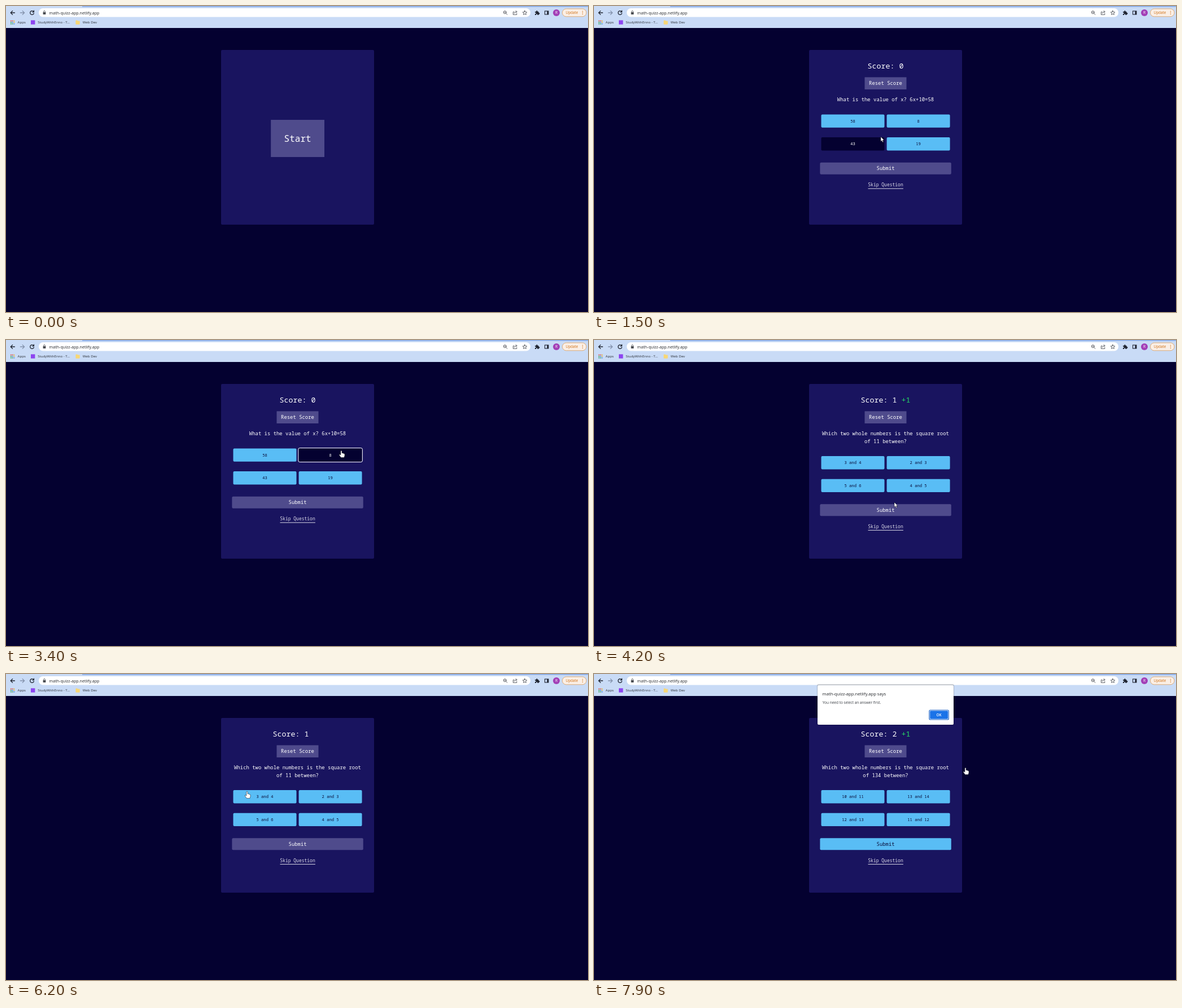
An HTML page that plays this animation: 1031x543 px, repeating every 8000 ms.

```html
<!DOCTYPE html>
<html lang="en">
<head>
<meta charset="utf-8">
<title>Math quiz</title>
<style>
  html, body { margin: 0; width: 100%; height: 100%; overflow: hidden; background: #040130; }
  svg { display: block; width: 1031px; height: 543px; }
  text { font-family: "Open Sans", sans-serif; }
  .app text { font-family: "Noto Sans Mono", monospace; text-anchor: middle; white-space: pre; }
  .line { fill: none; stroke-linecap: round; stroke-linejoin: round; }
</style>
</head>
<body>
<svg viewBox="0 0 1031 543">
  <rect width="1031" height="543" fill="#040130"/>

  <g id="toolbar">
    <rect width="1031" height="39" fill="#c9dbf6"/>
    <rect x="135" width="896" height="1.6" fill="#86abe9"/>
    <rect x="58" y="4" width="871" height="15.6" rx="7.8" fill="#fff"/>
    <g class="line" stroke="#1f2430" stroke-width="1.3">
      <path d="M15.4 12H8.4M11.6 8.6L8.2 12l3.4 3.4"/>
      <path d="M25.4 12h7M29.2 8.6l3.4 3.4-3.4 3.4" stroke="#8492ac"/>
      <path d="M48.9 10A3.4 3.4 0 1 0 49.4 13M49.4 8.2v2.6h-2.6"/>
    </g>
    <rect x="65.6" y="11" width="4.8" height="4" rx=".6" fill="#4a4d52"/>
    <path class="line" d="M66.6 11V9.9a1.4 1.4 0 0 1 2.8 0V11" stroke="#4a4d52" stroke-width=".8"/>
    <text x="76.6" y="14.5" font-size="7.15" fill="#24272c">math-quizz-app.netlify.app</text>

    <g class="line" stroke="#4d5157" stroke-width=".9">
      <circle cx="883.8" cy="11.2" r="2.5"/>
      <path d="M885.7 13.1l2.2 2.3M882.7 11.2h2.2"/>
      <path d="M900 10.4h-1.6v5h6.4v-2M900.4 13.2c.2-2 1.4-3 3.6-3M903 8.4l2.4 1.9-2.4 1.9"/>
      <path d="M919 8.3l1.1 2.5 2.7.2-2.1 1.8.7 2.6-2.4-1.4-2.4 1.4.7-2.6-2.1-1.8 2.7-.2z"/>
    </g>
    <path d="M937 10h2.2a1.3 1.3 0 1 1 2.4 0h2v2.1a1.3 1.3 0 1 1 0 2.4v1.4h-2.2a1.2 1.2 0 1 0-2.2 0H937v-2a1.2 1.2 0 1 0 0-2.2z" fill="#1f2430"/>
    <rect x="954.5" y="9" width="6.4" height="6" fill="none" stroke="#1f2430" stroke-width="1.1"/>
    <rect x="958.4" y="9" width="2.6" height="6" fill="#1f2430"/>
    <circle cx="975" cy="12" r="6" fill="#a23eb6"/>
    <text x="975" y="14.4" font-size="6.6" fill="#fff" text-anchor="middle">R</text>
    <rect x="985.5" y="5" width="42.5" height="13.8" rx="6.9" fill="#faefe6" stroke="#dfa568" stroke-width=".9"/>
    <text x="991.5" y="14.2" font-size="6.4" fill="#cf6f14">Update</text>
    <g fill="#cf6f14"><circle cx="1021.4" cy="9.4" r=".7"/><circle cx="1021.4" cy="12" r=".7"/><circle cx="1021.4" cy="14.6" r=".7"/></g>

    <g id="grid"></g>
    <rect x="44" y="25.3" width="7.4" height="7.4" fill="#8d45f0"/>
    <path d="M123.4 26.4q0-.9.9-.9h2l.9 1h2.6q.9 0 .9.9v4.4q0 .9-.9.9h-5.5q-.9 0-.9-.9z" fill="#f8d775"/>
    <g font-size="6.15" fill="#2b2f36">
      <text x="20.5" y="31.2">Apps</text>
      <text x="56.2" y="31.2">StudyWithEnno - T...</text>
      <text x="135.8" y="31.2">Web Dev</text>
    </g>
  </g>

  <g class="app">
    <rect x="381" y="78" width="271" height="310" rx="2" fill="#19145f"/>
    <g id="view"></g>
  </g>

  <g id="dialog">
    <rect x="395" y="18" width="243" height="73" rx="3" fill="#000" opacity=".18"/>
    <rect x="396" y="20" width="241" height="70" rx="2" fill="#fff"/>
    <text x="404.6" y="37.6" font-size="7.66" fill="#222529">math-quizz-app.netlify.app says</text>
    <text x="404.8" y="52.5" font-size="6.5" fill="#3a3e44">You need to select an answer first.</text>
    <rect x="593.9" y="64" width="34.4" height="17" rx="2" fill="#fff" stroke="#1b62c8" stroke-width="1.2"/>
    <rect x="595.2" y="65.3" width="31.8" height="14.4" rx="1.4" fill="#1a73e8"/>
    <text x="611" y="74.8" font-size="6.4" font-weight="600" fill="#fff" text-anchor="middle">OK</text>
  </g>

  <g id="cursor" fill="#fff" stroke="#05020f" stroke-width=".5" stroke-linejoin="round">
    <path id="arrow" d="M0 0V8.4L1.9 6.7 3.2 9.8 4.7 9.2 3.4 6.1H6z"/>
    <path id="hand" d="M-1.1 1Q0-.7 1.1 1V4.8Q2.6 4 3 5.2 4.3 4.5 4.7 5.8 6 5.4 6 6.8V9.3L5 12.6H-.6L-3.7 8.2Q-4 6.5-2.6 7L-1.1 8.2z"/>
  </g>
</svg>

<script>
const LOOP = 8000, STEP = 100, MID = 516.5;
const NAVY = '#040130', SKY = '#59bdf5', GREY = '#4f4b8c';
const $ = id => document.getElementById(id);

const questions = [
  { from: 1100, lines: ['What is the value of x? 6x+10=58'], answers: ['58', '8', '43', '19'] },
  { from: 4200, lines: ['Which two whole numbers is the square root', 'of 11 between?'],
    answers: ['3 and 4', '2 and 3', '5 and 6', '4 and 5'] },
  { from: 7300, lines: ['Which two whole numbers is the square root', 'of 134 between?'],
    answers: ['10 and 11', '13 and 14', '12 and 13', '11 and 12'] }
];

// Pointer moves: start, end, evenly timed points; it rests in between.
const moves = [
  [200, 600, '112,57 240,110 390,180 500,230 526,259'],
  [1100, 1500, '526,259 508,250 490,244 498,240 508,232'],
  [1700, 2300, '540,222 585,180 628,145 655,125 672,140 673,172 672,200'],
  [2500, 3200, '672,212 666,228 618,210 596,197'],
  [3400, 3800, '594,196 588,214 570,244 546,279 533,287'],
  [4000, 4000, '532,288'],
  [4700, 5500, '518,284 430,240 330,231'],
  [5700, 6300, '324,228 334,227 352,224 378,218 400,212 427,208 430,208'],
  [6500, 7100, '430,208 446,236 466,268 484,293 491,292 491,293 492,294'],
  [7300, 7300, '494,298'],
  [7900, 7900, '658,166']
].map(([a, b, pts]) => ({ a, b, pts: pts.split(' ').map(p => p.split(',').map(Number)) }));

function pointer(t) {
  const m = moves.filter(m => m.a <= t).pop();
  if (!m) return null;
  const last = m.pts.length - 1;
  const u = m.b > m.a ? Math.min(1, (t - m.a) / (m.b - m.a)) * last : 0;
  const i = Math.floor(u), p = m.pts[i], q = m.pts[Math.min(i + 1, last)];
  return p.map((v, k) => v + (q[k] - v) * (u - i));
}

const inside = (p, b) => p && p[0] >= b.x && p[0] <= b.x + b.w && p[1] >= b.y && p[1] <= b.y + b.h;
const text = (x, y, size, s, fill = '#fff') => `<text x="${x}" y="${y}" font-size="${size}" fill="${fill}">${s}</text>`;
const box = (b, fill) => `<rect x="${b.x}" y="${b.y}" width="${b.w}" height="${b.h}" rx="${b.r}" fill="${fill}"/>`;
const label = (b, size, s, fill) => text(b.x + b.w / 2, b.y + b.h / 2 + size * .36, size, s, fill);

function render(t) {
  const now = pointer(t), before = pointer(t - STEP);
  const frozen = t >= 7500;
  const targets = [];
  // The hover colour trails the pointer by one step.
  const hot = b => { targets.push(b); return inside(before, b); };
  let out = '';

  if (t < 800) {
    const b = { x: 469.2, y: 202, w: 94.8, h: 66, r: 0 }, on = hot(b);
    out += box(b, on ? SKY : GREY) + label(b, 16, 'Start', on ? NAVY : '#fff');
  } else {
    const q = questions.filter(q => q.from <= t).pop();
    const score = t < 4200 ? 0 : t < 7100 ? 1 : 2;
    const plus = t < 5200 || t >= 7100 ? '#27d965' : 'none';
    const bonus = score ? ` <tspan fill="${plus}">+1</tspan>` : '';
    out += text(MID, 110.8, 13.3, `Score: ${score}${bonus}`);

    const reset = { x: 479.5, y: 126.4, w: 74, h: 21.6, r: 0 };
    out += box(reset, GREY) + label(reset, 8.93, 'Reset Score', '#fff');

    const shift = q ? (q.lines.length - 1) * 13.6 : -97;
    if (q) {
      q.lines.forEach((s, i) => out += text(MID, 169.2 + i * 13.5, 8.93, s));
      const picked = t >= 3200 && t < 4200 ? 1 : t >= 6500 && t < 7100 ? 0 : -1;
      q.answers.forEach((s, i) => {
        const b = { x: 402.5 + i % 2 * 116.1, y: 192.4 + shift + (i >> 1) * 40.7, w: 112, h: 23.4, r: 2 };
        const on = hot(b) && !frozen || i === picked;
        out += box(b, on ? NAVY : SKY) + label(b, 7.17, s, on ? '#fff' : '#0a0c38');
        if (i === picked)
          out += `<rect x="${b.x - .8}" y="${b.y - .8}" width="${b.w + 1.6}" height="${b.h + 1.6}" rx="2.6" fill="none" stroke="#fff"/>`;
      });
    }
    const submit = { x: 400.4, y: 277.7 + shift, w: 232.4, h: 21, r: 2 };
    const on = hot(submit) || frozen;
    out += box(submit, on ? SKY : GREY) + label(submit, 8.93, 'Submit', on ? '#0a0c38' : '#fff');
    out += text(MID, 320.4 + shift, 8, 'Skip Question', '#dddce9');
    out += `<rect x="485.5" y="${323.5 + shift}" width="62.4" height="1" fill="#dddce9"/>`;
  }
  $('view').innerHTML = out;

  $('dialog').setAttribute('opacity', frozen ? Math.min(1, .5 + (t - 7500) / 400) : 0);

  const hand = frozen || targets.some(b => inside(now, b));
  $('cursor').setAttribute('visibility', now ? 'visible' : 'hidden');
  if (now) $('cursor').setAttribute('transform', `translate(${now})`);
  $('hand').setAttribute('opacity', hand ? 1 : 0);
  $('arrow').setAttribute('opacity', hand ? 0 : 1);
}

const dots = ['#e5443a', '#e5443a', '#e9b52c', '#35a553', '#4385f0', '#e9b52c', '#35a553', '#35a553', '#4385f0'];
$('grid').innerHTML = dots.map((c, i) =>
  `<rect x="${8 + i % 3 * 2.8}" y="${25.6 + Math.floor(i / 3) * 2.6}" width="1.7" height="1.7" fill="${c}"/>`).join('');

let shown = -1;
const start = performance.now();
function tick() {
  const t = Math.floor((performance.now() - start) % LOOP / STEP) * STEP;
  if (t !== shown) render(shown = t);
  requestAnimationFrame(tick);
}
tick();
</script>
</body>
</html>
```
